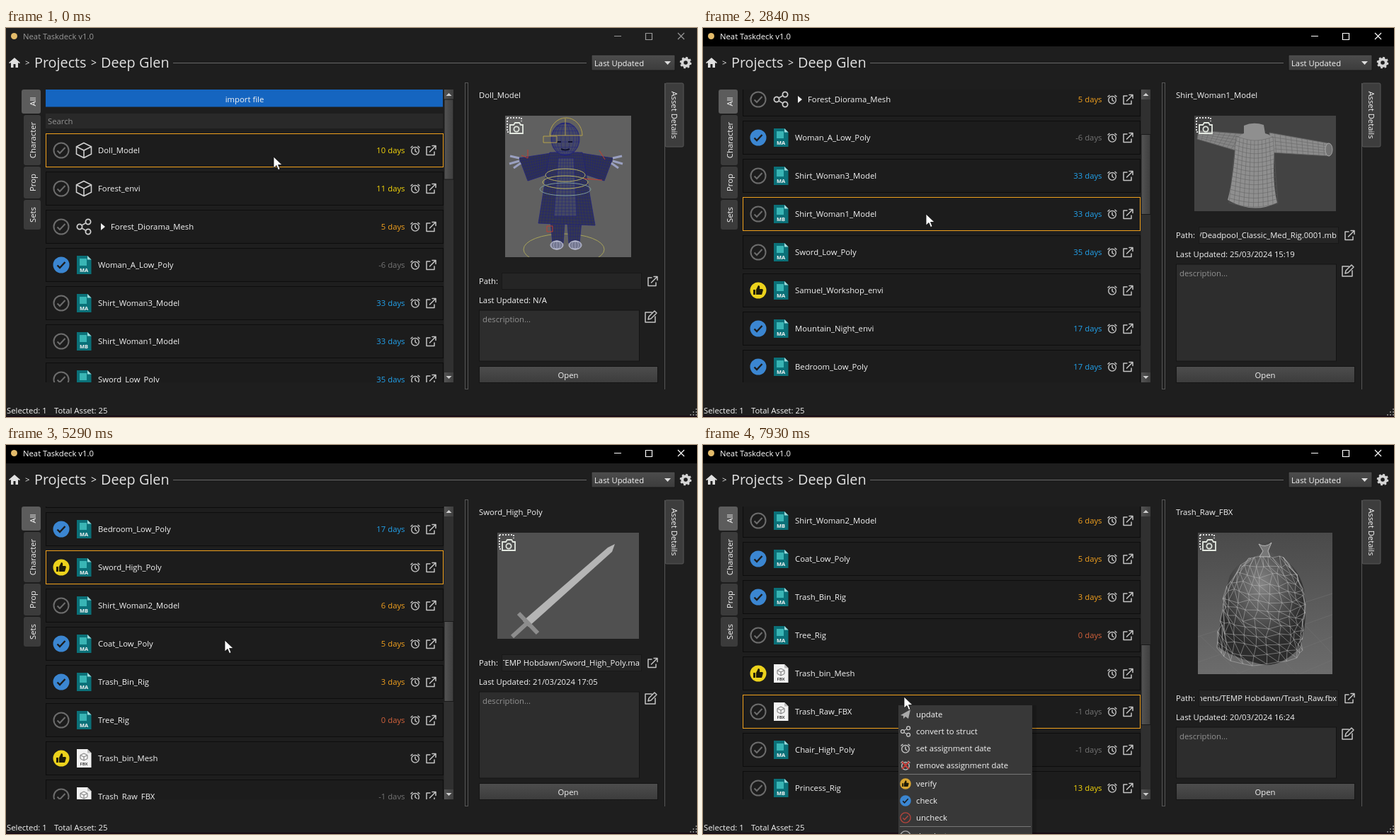
An HTML page for the animation above (8 s loop, 976x550 px).

```html
<!DOCTYPE html>
<html lang="en">
<head>
<meta charset="utf-8">
<title>Asset browser</title>
<style>
  html, body { margin: 0; width: 100%; height: 100%; overflow: hidden; background: #1e1e1e; }
  #stage { display: block; width: 100vw; height: 100vh; }
  text { font: 11.3px "Open Sans", "Noto Sans", sans-serif; fill: #f4f4f4; white-space: pre; }
  .h { font-size: 19.8px; fill: #e2e2e2; }
  .mid { text-anchor: middle; }
  .end { text-anchor: end; }
  .dim { fill: #929292; }
  .ext { font: 700 7.5px "Open Sans", sans-serif; text-anchor: middle; }
  .tiny { font-size: 3.6px; font-weight: 700; fill: #ddd; }
  .line { fill: none; stroke: #c4c4c4; stroke-width: 1.5; stroke-linejoin: round; stroke-linecap: round; }
</style>
</head>
<body>
<svg id="stage" viewBox="0 0 976 550"></svg>
<script>
const LOOP = 8000, TOP = 173, PITCH = 54, NOTCH = 60, STEP = 100, NAVY = '#20237c';

let seed = 7;
const rnd = () => (seed = seed * 16807 % 2147483647) / 2147483647;
const mix = (a, b, k) => a + (b - a) * k;

// Basic shapes
const text = (x, y, s, cls = '', more = '') => `<text x="${x}" y="${y}" class="${cls}" ${more}>${s}</text>`;
const rect = (x, y, w, h, fill, more = '') => `<rect x="${x}" y="${y}" width="${w}" height="${h}" fill="${fill}" ${more}/>`;
const path = (d, fill = 'none', stroke = 'none', sw = 1) => `<path d="${d}" fill="${fill}" stroke="${stroke}" stroke-width="${sw}"/>`;
const oval = (x, y, rx, ry, fill = 'none', stroke = 'none', sw = 1, more = '') =>
  `<ellipse cx="${x}" cy="${y}" rx="${rx}" ry="${ry}" fill="${fill}" stroke="${stroke}" stroke-width="${sw}" ${more}/>`;
const at = (x, y, s, more = '') => `<g transform="translate(${x} ${y}) ${more}">${s}</g>`;
const line = d => `<path class="line" d="${d}"/>`;
const clip = (x, y, w, h, s) => `<svg x="${x}" y="${y}" width="${w}" height="${h}" viewBox="${x} ${y} ${w} ${h}">${s}</svg>`;

// Wireframes: f maps u, v in 0..1 to a point
function mesh(f, n, m, ink, sw = .5, jit = 0, diag = false) {
  const p = Array.from({ length: n + 1 }, (_, i) => Array.from({ length: m + 1 }, (_, j) =>
    f(i / n, j / m).map(c => (c + (rnd() - .5) * jit).toFixed(1))));
  const runs = [...p, ...p[0].map((_, j) => p.map(r => r[j]))];
  if (diag) for (let i = 0; i < n; i++) for (let j = 0; j < m; j++) runs.push([p[i][j], p[i + 1][j + 1]]);
  return path(runs.map(r => 'M' + r.join('L')).join(''), 'none', ink, sw);
}
const bilinear = q => (u, v) => [0, 1].map(k => mix(mix(q[k], q[2 + k], u), mix(q[6 + k], q[4 + k], u), v));
const quad = (n, m, fill, ink, q, sw) => path(`M${q.join(' ')}Z`, fill, ink, .5) + mesh(bilinear(q), n, m, ink, sw);
const ball = (x, y, rx, ry, fill, ink, n = 6) => oval(x, y, rx, ry, fill, ink, .5) +
  mesh((u, v) => [x + rx * Math.sin((u - .5) * Math.PI) * Math.sin(v * Math.PI), y - ry * Math.cos(v * Math.PI)], n, 9, ink);
const cone = (x, y, w, h, fill, ink) => path(`M${x} ${y}L${x + w} ${y + h}Q${x} ${y + h + 8} ${x - w} ${y + h}Z`, fill, ink, .6) +
  mesh((u, v) => [x + w * v * (2 * u - 1), y + h * v + 5 * v * Math.sin(u * Math.PI)], 7, 9, ink);
const mirror = (x, s) => s + `<g transform="translate(${2 * x} 0) scale(-1 1)">${s}</g>`;

// Icons, centred on 0,0
const tick = 'M-5.500 .5L-2 4L5.500-4';
const thumb = path('M-7-1H-4V6H-7ZM-3-1L0-7Q3-7 2-2H6Q7.500-1 6.500 1L5 6H-3Z', '#1d1a08');
const ring = colour => oval(0, 0, 10.5, 10.5, 'none', colour, 2) + path(tick, 'none', colour, 2);
const status = {
  none: ring('#6c6c6c'),
  done: oval(0, 0, 11.5, 11.5, '#3b86d1') + path(tick, 'none', '#1c1c1c', 2.4),
  good: oval(0, 0, 11.5, 11.5, '#ecd21c') + thumb
};
const clock = oval(0, .8, 5.3, 5.3, 'none', '#c4c4c4', 1.4) + line('M0-2V1L2 2.500M-6-4L-4-5.800M6-4L4-5.800');
const open = line('M-1-5H-6V6.500H5V2M2-6.500H7V-1.500M7-6.500L-1.500 2');
const edit = line('M2-6H-7V8H7V0M-3 4L-2 0L6-8L9-5L1 3Z');
const nodes = [[-6, 0], [6, -7], [6, 7]].map(([x, y]) => oval(x, y, 3.6, 3.6, 'none', '#d0d0d0', 1.8)).join('') + line('M-3-2L3-5.500M-3 2L3 5.500');
const box = (r, ink, sw) => path(`M0 ${-r}L${r} ${-r / 2}V${r / 2}L0 ${r}L${-r} ${r / 2}V${-r / 2}ZM${-r} ${-r / 2}L0 0L${r} ${-r / 2}M0 0V${r}`, 'none', ink, sw);
const page = (fill, fold, s) => path('M-10-13H5L10.500-7.500V13H-10Z', fill) + path('M5-13V-7.500H10.500Z', fold) + s;
const scene = ext => page('#0b7078', '#9fdadb', rect(-6, -9, 10, 10, '#39b5b5') + text(0, 10, ext, 'ext'));
const icons = {
  cube: box(10.5, '#d0d0d0', 1.6), struct: nodes, ma: scene('MA'), mb: scene('MB'),
  fbx: page('#f2f2f2', '#bbb', at(0, -2, box(5, '#777', 1)) + text(0, 10, 'FBX', 'ext', 'style="fill:#444;font-size:6px"'))
};
const camera = oval(0, 0, 0, 0) + `<path d="M-13-14H7V-9M-13-14V6H-9" fill="none" stroke="#ddd" stroke-width="2" stroke-dasharray="2 2"/>` +
  path('M-9-4H-4L-2-7H4L6-4H9V8H-9Z', 'none', '#e3e8e0', 1.8) + oval(0, 2, 3.6, 3.6, 'none', '#e3e8e0', 1.8);

// name, icon, status, days left
const rows = `Doll_Model cube none 10
Forest_envi cube none 11
Forest_Diorama_Mesh struct none 5
Woman_A_Low_Poly ma done -6
Shirt_Woman3_Model ma none 33
Shirt_Woman1_Model mb none 33
Sword_Low_Poly ma none 35
Samuel_Workshop_envi ma good
Mountain_Night_envi ma done 17
Bedroom_Low_Poly ma done 17
Sword_High_Poly ma good
Shirt_Woman2_Model mb none 6
Coat_Low_Poly ma done 5
Trash_Bin_Rig ma done 3
Tree_Rig ma none 0
Trash_bin_Mesh fbx good
Trash_Raw_FBX fbx none -1
Chair_High_Poly ma none -1
Princess_Rig mb none 13`.split('\n').map(s => s.split(' '));
const urgency = d => d < 0 ? '#747474' : d == 0 ? '#d4623c' : d < 10 ? '#f2a01e' : d < 15 ? '#f5d60a' : '#22a2ec';
const row = ([name, icon, state, days], i) => {
  const nested = icon == 'struct';
  return at(0, TOP + i * PITCH, rect(56.5, -23.5, 561, 47, '#1c1c1c', 'class="row"') +
    at(78, 0, status[state]) + at(110, 0, icons[icon]) + (nested ? path('M134-5L140 0L134 5Z', '#eee') : '') +
    text(nested ? 148 : 130, 4, name) + (days ? text(563.5, 4, days + ' days', 'end', `style="fill:${urgency(days)}"`) : '') +
    at(578, 0, clock) + at(600, 0, open));
};

// Preview pictures
const captions = (x, y, s) => s.split(',').map((w, i) => text(x, y + i * 6, w, 'tiny')).join('');
const doll = () => oval(788, 313, 57, 22, 'none', '#a8a45a') +
  mirror(791, quad(5, 9, '#353850', NAVY, [768, 262, 790, 262, 787, 304, 772, 304]) + ball(778, 307, 9, 6, '#555a74', '#c8cbe0') +
    quad(13, 8, '#30334e', NAVY, [776, 176, 725, 184, 737, 216, 770, 205]) +
    path('M725 184L712 181M725 188L711 192M727 191L717 198', 'none', '#9aa0c0', 3)) +
  quad(18, 24, '#33364f', NAVY, [768, 176, 814, 176, 832, 279, 752, 276]) + quad(6, 18, '#454961', NAVY, [780, 184, 802, 184, 806, 266, 774, 266]) +
  ball(790, 157, 20, 23, '#454866', NAVY, 10) + path('M778 161h6m10 0h6M784 171q6 3 12 0', 'none', '#101230', 2) +
  path('M768 152A22 24 0 0 1 814 152ZM759 153H778V162H759ZM790 128V152', 'none', '#b5a24a') +
  [0, 1, 2].map(i => oval(790, 208 + i * 10, 28 + i * 4, 9, 'none', i == 2 ? '#7d9a9c' : '#b8b264')).join('') +
  path('M737 172V184L728 180M838 173L846 186M816 213L842 215M764 280h8v8h-8Z', 'none', '#c03c30');

const forest = () => {
  let s = path('M718 228L790 197L874 233V245L800 275L718 241Z', '#aaaab0') + path('M718 228L790 197L874 233L800 262Z', '#7b7c84', NAVY, .7) +
    path('M766 192V222M789 198V225M845 215V232', 'none', '#888', 4) +
    cone(808, 130, 18, 56, '#b9b9bd', NAVY) + cone(825, 164, 18, 47, '#b9b9bd', NAVY);
  for (let i = 0; i < 75; i++) {
    const [x, y] = bilinear([722, 228, 790, 201, 868, 233, 800, 258])(rnd(), rnd());
    s += path(`M${x.toFixed(1)} ${y.toFixed(1)}l${(3 - rnd() * 7).toFixed(1)} -5l4 3l3 -4l-1 7z`, '#84858d', NAVY, .8);
  }
  for (const [x, y, r] of [[758, 195, 12], [793, 189, 10], [774, 197, 9], [776, 179, 16], [845, 215, 9]]) s += ball(x, y, r, r * .9, '#b9b9bd', NAVY);
  return s + path('M790 264Q799 236 808 262V271H790Z', '#a5a5aa', NAVY, .6);
};

const head = () => path('M751 235V267Q733 274 730 300Q780 333 831 300Q826 276 803 264V225Z', '#c6a392') +
  path('M735 175Q732 213 748 240Q758 254 770 252Q792 247 805 215L810 170Q775 140 735 175Z', '#c39f90') +
  mesh((u, v) => [735 + u * 70 + 8 * Math.sin(v * 3), 175 + v * 75 - 10 * u], 18, 18, '#77595c', .4) +
  mesh((u, v) => [751 - 20 * v + u * (52 + 46 * v), 255 + 46 * v + 14 * v * Math.sin(u * Math.PI)], 18, 11, '#77595c', .4) +
  path('M731 190Q719 148 755 132Q792 119 817 144Q836 165 824 208Q820 240 808 258L797 247Q806 205 803 178Q770 158 737 178Z', '#37374d') +
  mesh((u, v) => [732 + u * 92, 135 + 20 * Math.abs(u - .5) + v * 34], 14, 7, '#25274f', .7) +
  mesh((u, v) => [804 + u * 19 - v * 8, 165 + v * 84], 4, 15, '#22243f', .8) +
  path('M734 172Q770 154 806 168V184Q770 175 736 190Z', '#663d38') + path('M737 195Q744 189 754 194M768 194Q780 187 793 194', 'none', '#37233a', 3) +
  [747, 781].map(x => oval(x, 204, 8, 4.5, '#bfb5b9', '#2a1c3a', 1.5) + oval(x, 204, 3.5, 4, '#22245c')).join('') +
  path('M752 211Q756 207 760 213Q767 210 766 216L754 218Z', '#27294f') + path('M750 237Q763 230 776 237Q764 246 750 237Z', '#98605f') +
  path('M750 262Q778 272 804 259M770 269Q750 258 757 274ZQ790 258 785 274ZL763 292M770 269L780 287', 'none', '#222650', 2.5) +
  captions(841, 127, 'Backfaces,Smoothness,Instance,Display Layer,Distance From Camera,Selected Objects') + captions(841, 314, 'Evaluation,GPU Rows');

const shirt = () => quad(9, 5, '#858585', '#606060', [768, 150, 700, 145, 698, 157, 752, 173]) +
  quad(11, 5, '#8c8c8c', '#606060', [800, 148, 884, 163, 885, 181, 802, 176]) + oval(884, 172, 5, 9, '#747474', '#a5a5a5') +
  path('M764 138Q777 132 792 137L794 149Q804 151 808 162Q803 215 811 247Q777 264 741 243Q749 214 752 166Q754 152 764 149Z', '#8f8f8f') +
  mesh((u, v) => [753 - 10 * v + u * (52 + 17 * v), 153 + v * 94 + 6 * Math.sin(u * 3)], 10, 15, '#5e5e5e');

const house = () => path('M696 221L775 199L889 234V238L742 270L696 230Z', '#8f8f8f') + path('M696 223L742 263L889 232', 'none', '#b0b0b0', 3) +
  path('M760 190L804 214V245L760 224Z', '#777') + path('M804 214L801 178L833 134L868 183V231L804 245Z', '#969696') + path('M804 212L867 199M812 171H862', 'none', '#6b6b6b', 2) +
  [[821, 167], [821, 203]].map(([x, y]) => quad(2, 1, '#777', '#bbb', [x, y, x + 20, y - 3, x + 20, y + 17, x, y + 21], 1)).join('') +
  quad(11, 9, '#a9a9a9', '#777', [777, 133, 830, 126, 804, 208, 747, 187], .8) + path('M874 186L832 130L804 208', 'none', '#bdbdbd', 3) +
  mesh(bilinear([714, 214, 763, 210, 792, 236, 742, 246]), 13, 6, '#5e5e5e', .8, 7) + path('M733 246Q740 232 766 246L750 253Z', '#b4b4b4');

const bin = () => [71, 84].map(r => oval(794, 242, r, r * .61, 'none', '#8f8d5e')).join('') + oval(809, 226, 7, 11, '#8d8d8d', '#bdbdbd', 2) +
  path('M759 166L830 165L815 231L796 243L768 232Z', '#bcbcbc') + path('M797 177L830 165L815 231L796 243Z', '#999') +
  path('M753 164Q756 151 776 146L805 144L833 156L834 163L800 179Z', '#d5d5d5') + path('M753 164L800 177L834 161M764 195L794 203L818 194M768 207H785V231H770Z', 'none', '#8b8b8b', 1.5) +
  captions(874, 129, 'Backfaces,Display Layer,Distance From,Selected Obj');

const bag = () => {
  const skin = (u, v) => {
    const half = 26 + 33 * Math.sin(Math.min(1, v * 2) * Math.PI / 2);
    return [797 - 11 * v + half * Math.sin((u - .5) * Math.PI), 160 + v * (128 + 21 * Math.sin(u * Math.PI))];
  };
  return mesh(bilinear([640, 290, 889, 210, 970, 300, 760, 400]), 4, 4, '#747474') +
    path('M770 162L790 153L786 139L802 137L801 151Q840 165 849 205Q855 250 843 286Q820 312 793 311Q750 302 727 285Q734 220 744 185Q755 166 770 162Z', 'url(#bag)') +
    mesh(skin, 11, 12, '#bfbfbf', .5, 7, true) + path('M785 140Q794 146 803 138L798 150L801 158H786L791 150Z', '#777', '#ccc', .8);
};
const sword = () => path('M730 249L850 145L860 140L856 151L738 257Z', '#b5b5b5') + path('M724 238L751 266M715 271L737 251', 'none', '#8d8d8d', 6);

const na = 'N/A', temp = 'Documents/TEMP Hobdawn/';
// row: width, height, backdrop, art, path, updated
const shots = {
  0: [178, 200, '#606060', doll, '', na],
  1: [200, 151, '#505257', forest, '', na],
  3: [168, 200, '#5b5b5b', head, 'Glen/assets/Woman_A_Low_Poly.ma', '05/10/2024 15:11'],
  5: [200, 135, '#434343', shirt, '/Deadpool_Classic_Med_Rig.0001.mb', '25/03/2024 15:19'],
  7: [200, 147, '#4d4d4d', house, 'TEMP Hobdawn/Wolverine_Rig_01.ma', '22/03/2024 21:15'],
  10: [200, 150, '#505050', sword, temp + 'Sword_High_Poly.ma', '21/03/2024 17:05'],
  13: [200, 175, '#5b5b5b', bin, temp + 'Trash_Bin_Rig.ma', '20/03/2024 18:42'],
  16: [190, 200, 'url(#haze)', bag, temp + 'Trash_Raw.fbx', '20/03/2024 16:24']
};
const details = ([i, [w, h, back, art, file, date]]) => {
  const x = 794 - w / 2, y = 158 + h;
  return `<g class="shot" data-row="${i}">` + text(668, 99, rows[i][0]) +
    clip(x, 124, w, h, rect(x, 124, w, h, back) + art() + at(x + 16, 141, camera)) +
    text(668, y + 4, 'Path:') + rect(700.5, y - 11.5, 197, 23, '#252525', 'stroke="#181818"') + clip(702, y - 11, 194, 22, text(895, y + 4, file, 'end')) +
    at(913, y, open) + text(668, y + 31, 'Last Updated: ' + date) + rect(668.5, y + 41, 226, 430 - y, '#2d2d2d', 'stroke="#141414"') +
    text(673, y + 58, 'description...', 'dim') + at(910, y + 50, edit) + '</g>';
};

// Window parts
const tab = (s, x, y, h, fill) => rect(x, y, 49 - x, h, fill, 'rx="3"') + at(42, y + h / 2, text(0, 0, s, 'mid'), 'rotate(-90)');
const titlebar = '<g id="title">' + rect(0, 0, 976, 26, '#000', 'id="bar"') + oval(11.5, 11.5, 4.5, 4.5, '#e3bb6a') +
  text(24, 16, 'Neat Taskdeck v1.0', '', 'style="fill:currentColor"') + path('M859 11.500H869M903.500 7.500H912.500V16.500H903.500ZM949 7L958 16M958 7L949 16', 'none', 'currentColor', 1.2) + '</g>';
const gear = oval(0, 0, 4.8, 4.8, 'none', '#d5d5d5', 4) + oval(0, 0, 7, 7, 'none', '#d5d5d5', 2.6, 'stroke-dasharray="2.75 2.75"');
const header = at(12, 49, path('M-8 0L0-7L8 0L7 1L5 0V7H1.500V2H-1.500V7H-5V0L-7 1Z', '#e0e0e0')) +
  text(27, 53, '&gt;') + text(40, 56, 'Projects', 'h') + text(120, 54, '&gt;', '', 'style="font-size:14px"') + text(134, 56, 'Deep Glen', 'h') +
  path('M236 49.500H820', 'none', '#676767') + rect(827, 38, 118, 22, 'url(#btn)', 'rx="1" stroke="#161616"') + text(831, 54, 'Last Updated') +
  path('M930 47H939L934.500 52Z', '#ddd') + at(960, 49, gear);
const tabs = tab('All', 22, 87, 34, '#5c5c5c') + tab('Character', 25, 123, 71, '#3b3b3b') + tab('Prop', 25, 196, 45, '#3b3b3b') + tab('Sets', 25, 243, 42, '#3b3b3b');
const list = clip(56, 87, 562, 414, '<g id="list">' + rect(56, 87, 561, 24.5, '#1565c0') + text(337, 104.5, 'import file', 'mid') +
  rect(56, 121, 561, 21, '#292929') + text(59, 136, 'Search', 'dim') + rows.map(row).join('') + '</g>');
const scrollbar = rect(618.5, 87, 13.5, 414, '#303030') + [87, 487].map(y => rect(619, y, 13, 14, 'url(#grip)')).join('') +
  path('M621.500 96H629.500L625.500 92ZM621.500 492H629.500L625.500 496Z', '#d0d0d0') + rect(619, 101, 13, 113, 'url(#grip)', 'id="thumb" stroke="#191919"');
const side = rect(648.5, 77.5, 4, 433, 'none', 'stroke="#565656"') + path('M930.500 78V511', 'none', '#565656') +
  rect(931, 78, 26, 90, '#3d3d3d', 'rx="2" stroke="#575757"') + at(940, 123, text(0, 0, 'Asset Details', 'mid'), 'rotate(90)') +
  Object.entries(shots).map(details).join('') + rect(668.5, 478.5, 252, 23, 'url(#btn)', 'stroke="#151515"') + text(794, 495, 'Open', 'mid');
const footer = text(1, 545, 'Selected: 1') + text(68, 545, 'Total Asset: 25') + rect(0, 548, 976, 2, '#180b14') +
  path('M966 547h2m2 0h2m2 0h2M970 543h2m2 0h2M974 539h2', 'none', '#777', 2);

const small = s => `<g transform="scale(.68)">${s}</g>`;
const sections = [
  [['update', path('M-7 1L7-7L4 6L0 3L-3 6V2Z', '#aaa')], ['convert to struct', small(nodes)], ['set assignment date', clock],
    ['remove assignment date', clock + path('M-5-5L5 5M5-5L-5 5', 'none', '#c23a36', 2)]],
  [['verify', small(oval(0, 0, 11.5, 11.5, '#d9a531') + thumb)], ['check', small(status.done)], ['uncheck', small(ring('#b5443c'))]],
  [['deselect', small(ring('#aaa'))]]
];
let itemY = 381;
const section = (entries, i) => {
  if (i) itemY += 2;
  return (i ? path(`M278 ${itemY - 13.5}H463`, 'none', '#777') : '') +
    entries.map(([s, icon]) => { const y = itemY; itemY += 24; return at(286, y, icon) + text(301, y + 4, s); }).join('');
};
const menu = '<g id="menu">' + rect(276, 368, 195, 182, '#000', 'opacity=".15"') + rect(276, 368, 189, 190, '#383838') + sections.map(section).join('') + '</g>';
const pointer = '<g id="cursor">' + path('M0 0V16L4 12.500L6.500 18.500L9 17.500L6.500 11.500H12Z', '#fff', '#111', .8) + '</g>';
const grad = (id, a, b, across = false) => `<linearGradient id="${id}" x2="${+across}" y2="${+!across}"><stop stop-color="${a}"/><stop offset="1" stop-color="${b}"/></linearGradient>`;

const stage = document.getElementById('stage');
stage.innerHTML = '<defs>' + grad('btn', '#4d4d4d', '#3c3c3c') + grad('grip', '#545454', '#3e3e3e', true) + grad('haze', '#4a4a4a', '#6c6c6c') +
  '<radialGradient id="bag" cx=".5" cy=".35"><stop stop-color="#858585"/><stop offset="1" stop-color="#2c2c2c"/></radialGradient></defs>' +
  rect(0, 0, 976, 550, '#1e1e1e') + titlebar + header + tabs + list + scrollbar + side + footer + menu + pointer;

const $ = id => document.getElementById(id);
const frames = [...stage.querySelectorAll('.row')], panels = [...stage.querySelectorAll('.shot')];

// Pointer trips: arrival time, steps taken, x, y, whether a click follows
const trips = [
  [710, 5, 332, 230, true], [1930, 4, 326, 233, true], [2740, 4, 315, 263, true], [3460, 1, 315, 261, true],
  [4590, 1, 309, 276, true], [5700, 4, 296, 334, true], [6410, 5, 287, 382], [6710, 1, 287, 366, true],
  [7220, 4, 264, 356], [7630, 4, 276, 368], [7930, 1, 284, 356]
];
const wheel = [1110, 1410, 2240, 3145, 3145, 4093, 4200, 4990, 5190, 6510, 6610];
const MENU_AT = 7830;

const scrollAt = t => NOTCH * wheel.filter(w => w <= t).length;
const rowAt = (y, t) => Math.round((y + scrollAt(t) - TOP) / PITCH);
const clicks = trips.filter(s => s[4]).map(([t, , , y]) => [t + STEP, rowAt(y, t)]);
const pointerAt = t => trips.reduce(([px, py], [end, n, x, y]) => {
  const k = Math.min(1, Math.max(0, Math.floor((t - end) / STEP + n) / n));
  return [mix(px, x, k), mix(py, y, k)];
}, [378, 182]);

// A row lights up only once the pointer has moved after scrolling
function hoverAt(t, y) {
  const moved = Math.max(0, ...trips.map(([end, n]) => end - (n - 1) * STEP).filter(s => s <= t));
  return moved > Math.max(0, ...wheel.filter(w => w <= t)) ? rowAt(y, t) : -1;
}

function update(t) {
  const [x, y] = pointerAt(t), scroll = scrollAt(t), hover = hoverAt(t, y);
  const [, sel] = clicks.filter(c => c[0] <= t).pop() || [0, 0];
  const active = t >= clicks[0][0];
  $('list').setAttribute('transform', `translate(0 ${-scroll})`);
  $('thumb').setAttribute('y', 101 + scroll * .275);
  frames.forEach((f, i) => f.setAttribute('stroke', i == sel ? '#f0a01c' : i == hover ? '#1763c4' : '#0d0d0d'));
  panels.forEach(p => p.style.display = p.dataset.row == sel ? '' : 'none');
  $('bar').style.display = active ? '' : 'none';
  $('title').style.color = active ? '#fff' : '#999';
  $('menu').style.display = t >= MENU_AT ? '' : 'none';
  $('cursor').setAttribute('transform', `translate(${Math.round(x)} ${Math.round(y)})`);
}

const start = performance.now();
(function play() {
  update((performance.now() - start) % LOOP);
  requestAnimationFrame(play);
})();
</script>
</body>
</html>
```
